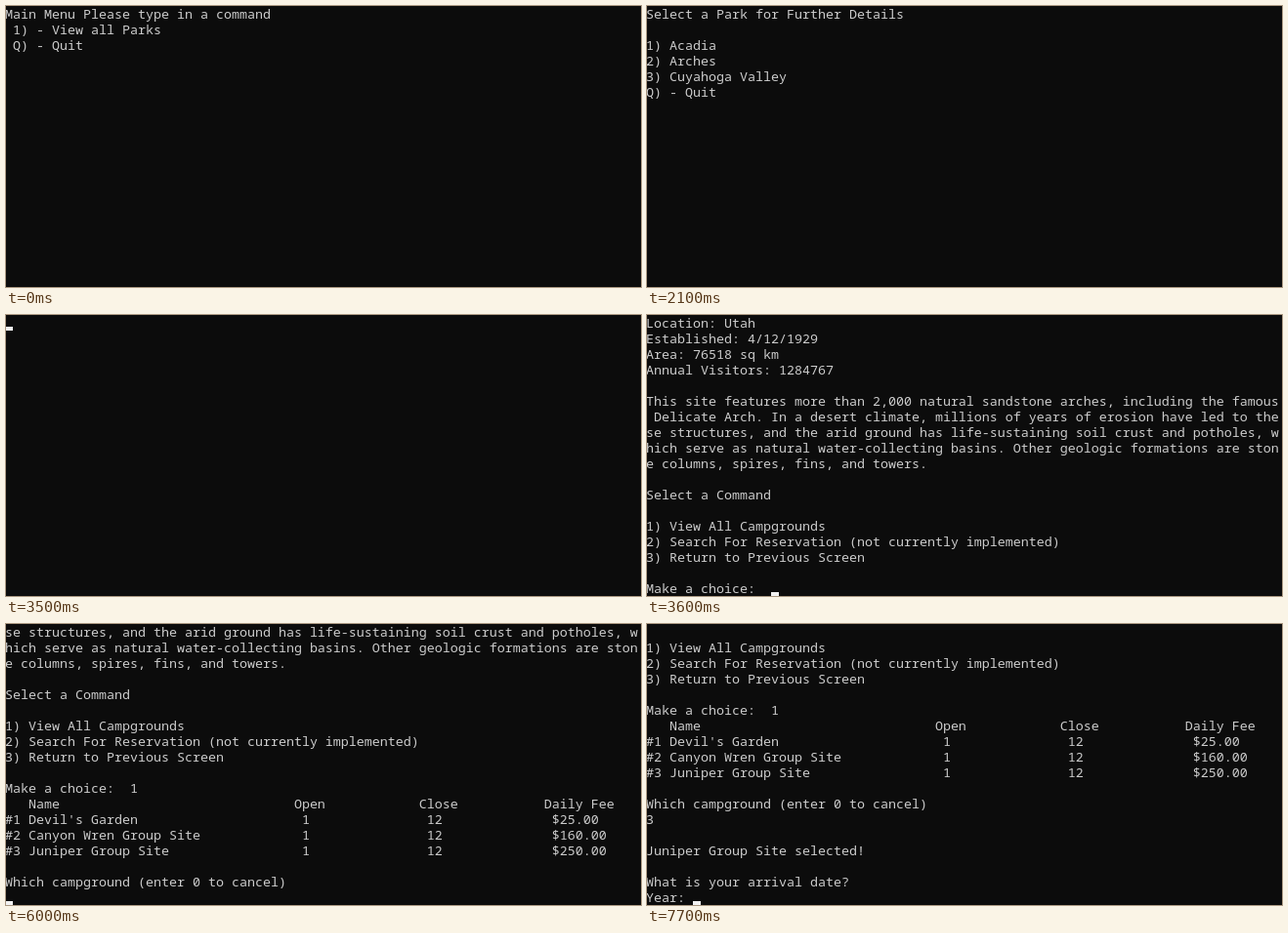
Recreate the animation shown at these times as an HTML page. Size 650 by 288 pixels, loop 8 s.

```html
<!DOCTYPE html>
<html lang="en">
<head>
<meta charset="utf-8">
<title>Park campground console</title>
<style>
  html, body { margin: 0; width: 100%; height: 100%; overflow: hidden; background: #0c0c0c; }
  #screen {
    position: absolute; left: -1px; top: 0; margin: 0;
    font: 13.3333px/16px "Noto Sans Mono", monospace;
    font-variant-ligatures: none;
    color: #ccc; white-space: pre;
  }
  #cursor { position: absolute; width: 8px; height: 4px; background: #f2f2f2; }
</style>
</head>
<body>
<pre id="screen"></pre>
<div id="cursor"></div>
<script>
const COLS = 81, ROWS = 18, CELL_W = 8, CELL_H = 16, LOOP = 8000;

const wrap = text => text.match(new RegExp(`.{1,${COLS}}`, 'g')).join('\n');
const tableRow = (name, open, close, fee) =>
  name.padEnd(37) + open.padEnd(16) + close.padEnd(16) + fee + '\n';

const mainMenu = `Main Menu Please type in a command
 1) - View all Parks
 Q) - Quit

`;

const parkTitle = 'Select a Park for Further Details\n\n';
const firstPark = parkTitle + '1) Acadia\n';
const allParks = firstPark + '2) Arches\n3) Cuyahoga Valley\n';
const parkMenu = allParks + 'Q) - Quit\n\n';

const description = wrap('This site features more than 2,000 natural sandstone arches, ' +
  'including the famous Delicate Arch. In a desert climate, millions of years of erosion ' +
  'have led to these structures, and the arid ground has life-sustaining soil crust and ' +
  'potholes, which serve as natural water-collecting basins. Other geologic formations ' +
  'are stone columns, spires, fins, and towers.');

const parkDetails = `Location: Utah
Established: 4/12/1929
Area: 76518 sq km
Annual Visitors: 1284767

${description}

Select a Command

1) View All Campgrounds
2) Search For Reservation (not currently implemented)
3) Return to Previous Screen

Make a choice:  `;

const campgrounds = parkDetails + '1\n' +
  tableRow('   Name', 'Open', 'Close', 'Daily Fee') +
  tableRow("#1 Devil's Garden", ' 1', ' 12', ' $25.00') +
  tableRow('#2 Canyon Wren Group Site', ' 1', ' 12', ' $160.00') +
  tableRow('#3 Juniper Group Site', ' 1', ' 12', ' $250.00') +
  '\nWhich campground (enter 0 to cancel)\n';

const arrival = campgrounds +
  '3\n\nJuniper Group Site selected!\n\nWhat is your arrival date?\nYear: ';

// [start ms, console output, cursor visible]
const timeline = [
  [0, mainMenu, false],
  [1000, mainMenu, true],
  [1300, mainMenu + '1', true],
  [1500, mainMenu + '1', false],
  [1700, '', true],
  [1900, firstPark, true],
  [2000, allParks, true],
  [2100, parkMenu, false],
  [2900, parkMenu, true],
  [3200, parkMenu + '2', true],
  [3400, parkMenu + '2', false],
  [3500, '', true],
  [3600, parkDetails, true],
  [4400, parkDetails, false],
  [4600, parkDetails + '1', true],
  [4900, parkDetails + '1', false],
  [5300, parkDetails + '1', true],
  [5800, parkDetails + '1', false],
  [6000, campgrounds, true],
  [6800, campgrounds, false],
  [7300, campgrounds, true],
  [7500, campgrounds + '3', true],
  [7700, arrival, true],
];

const screenEl = document.getElementById('screen');
const cursorEl = document.getElementById('cursor');
let shown;

function show(state) {
  if (state === shown) return;
  shown = state;
  const [, output, cursorOn] = state;
  const lines = output.split('\n').slice(-ROWS);
  screenEl.textContent = lines.join('\n');
  cursorEl.style.left = lines.at(-1).length * CELL_W - 1 + 'px';
  cursorEl.style.top = lines.length * CELL_H - 4 + 'px';
  cursorEl.style.visibility = cursorOn ? 'visible' : 'hidden';
}

function tick() {
  const time = performance.now() % LOOP;
  show(timeline.findLast(([start]) => start <= time));
  requestAnimationFrame(tick);
}
tick();
</script>
</body>
</html>
```
